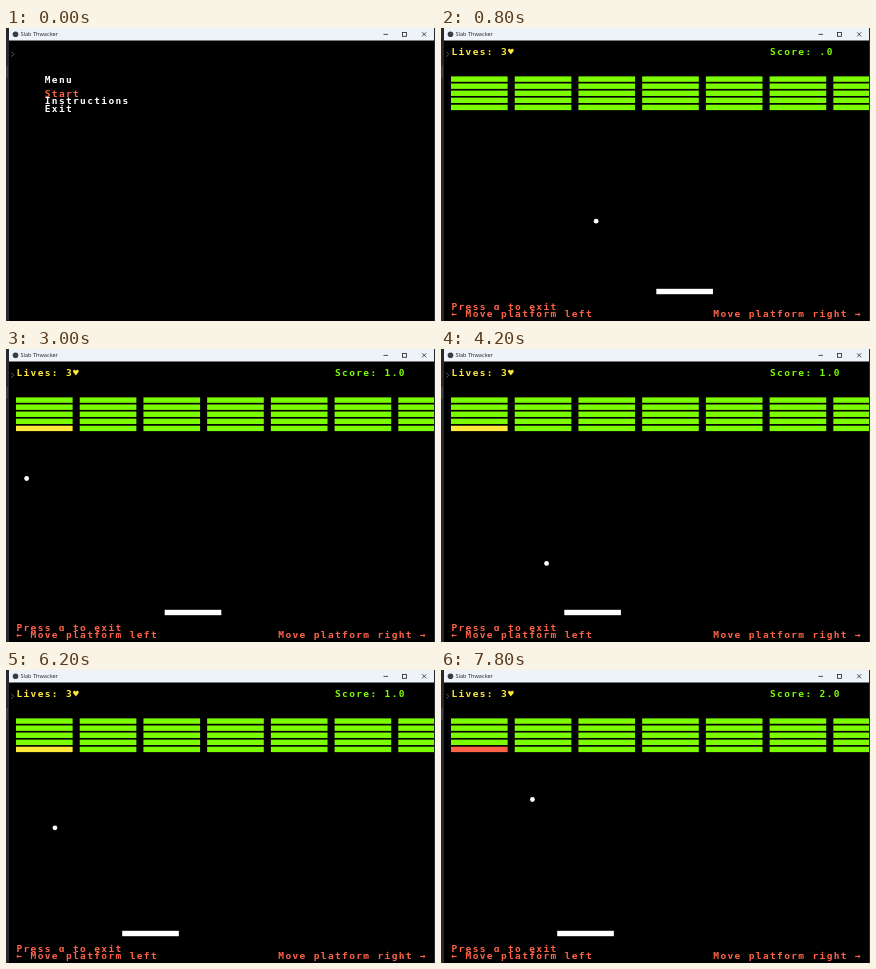
An HTML page that plays this animation: 429x293 px, repeating every 8000 ms.

```html
<!DOCTYPE html>
<html lang="en">
<head>
<meta charset="utf-8">
<title>Slab Thwacker</title>
<style>
  html, body { margin: 0; width: 100%; height: 100%; overflow: hidden; background: #000; }
  svg { display: block; width: 100vw; height: 100vh; }
  .cell { font: bold 9.5px "DejaVu Sans Mono", monospace; letter-spacing: 1.36px; white-space: pre; }
  .title { font: 5.6px "Open Sans", sans-serif; }
</style>
</head>
<body>
<svg id="stage" viewBox="0 0 429 293">
  <rect width="429" height="293" fill="#26282d"/>
  <rect y="38" width="2" height="12" fill="#3b3e47"/>
  <rect x="3" y="12" width="425" height="281"/>
  <rect x="3" width="425" height="12.5" fill="#eef2f9"/>
  <circle cx="9.5" cy="6.3" r="2.8" fill="#3a3d42"/>
  <text class="title" x="14.5" y="8.3" fill="#222">Slab Thwacker</text>
  <g fill="none" stroke="#222" stroke-width=".8">
    <path d="M377.5 6.4h4.5M416.2 4.3l4 4M420.2 4.3l-4 4"/>
    <rect x="396.5" y="4.4" width="3.9" height="3.9"/>
  </g>
  <path d="M5.3 23.8l2.5 2.5-2.5 2.5" fill="none" stroke="#55585e"/>
  <g id="menu"></g>
  <g id="game"></g>
</svg>
<script>
const NS = "http://www.w3.org/2000/svg";
const LOOP = 8000, TICK = 200, GAME_START = 200;
const CELL = 7.08, EDGE = 428;
const LIME = "#7cfc00", YELLOW = "#ffe93b", TOMATO = "#ff6347", WHITE = "#fff";
const HITS = [2600, 7400];

// [time, column, row]: straight runs between bounces
const BALL = [
  [200, 26, 31], [800, 20, 25], [2000, 9, 14], [2400, 5, 10], [2900, 0, 15],
  [4800, 19, 34], [6700, 0, 15], [7200, 5, 10], [7800, 11, 16]
];
// [time, column]
const PADDLE = [[800, 29], [2000, 26], [3000, 21], [4200, 16], [4800, 16], [5000, 15]];

const menu = document.getElementById("menu");
const game = document.getElementById("game");
const colX = c => 10 + c * CELL;
const rowY = r => 16.5 + r * CELL;

function add(parent, tag, attrs) {
  const el = document.createElementNS(NS, tag);
  for (const k in attrs) el.setAttribute(k, attrs[k]);
  return parent.appendChild(el);
}

// A terminal row: each line blanks its own cells before drawing
function write(parent, col, row, str, fill) {
  add(parent, "rect", {
    x: colX(col), y: rowY(row) - 3.5, width: Math.min(str.length * CELL, EDGE - colX(col)), height: CELL
  });
  const el = add(parent, "text", { class: "cell", x: colX(col) + 0.4, y: rowY(row) + 3.3, fill });
  el.textContent = str;
  return el;
}

function bar(col, row, fill) {
  const x = colX(col);
  return add(game, "rect", {
    x, y: rowY(row) - 3.5, width: Math.min(8 * CELL, EDGE - x), height: 5.4, fill
  });
}

write(menu, 4, 5, "Menu", WHITE);
write(menu, 4, 7, "Start", TOMATO);
write(menu, 4, 8, "Instructions", WHITE);
write(menu, 4, 9, "Exit", WHITE);

write(game, 0, 1, "Lives: 3♥", YELLOW);
const score = write(game, 45, 1, "Score: .0", LIME);
write(game, 0, 37, "Press q to exit", TOMATO);
write(game, 0, 38, "← Move platform left", TOMATO);
write(game, 37, 38, "Move platform right →", TOMATO);

let target;
for (let row = 5; row < 10; row++) {
  for (let i = 0; i < 7; i++) {
    const brick = bar(i * 9, row, LIME);
    if (row === 9 && i === 0) target = brick;
  }
}
const paddle = bar(0, 35, WHITE);
const ball = add(game, "circle", { r: 2.4, fill: WHITE });

function track(keys, t, field) {
  if (t <= keys[0][0]) return keys[0][field];
  for (let i = 1; i < keys.length; i++) {
    const a = keys[i - 1], b = keys[i];
    if (t <= b[0]) return Math.round(a[field] + (b[field] - a[field]) * (t - a[0]) / (b[0] - a[0]));
  }
  return keys[keys.length - 1][field];
}

function draw(ms) {
  const t = Math.floor((ms % LOOP) / TICK) * TICK;
  const playing = t >= GAME_START;
  menu.style.display = playing ? "none" : "";
  game.style.display = playing ? "" : "none";

  const hits = HITS.filter(h => t >= h).length;
  score.textContent = "Score: " + (hits || "") + ".0";
  target.setAttribute("fill", [LIME, YELLOW, TOMATO][hits]);
  paddle.setAttribute("x", colX(track(PADDLE, t, 1)));
  ball.setAttribute("cx", colX(track(BALL, t, 1) + 0.5));
  ball.setAttribute("cy", rowY(track(BALL, t, 2)) - 0.3);
}

const start = performance.now();
function frame() {
  draw(Math.max(0, performance.now() - start));
  requestAnimationFrame(frame);
}
frame();
</script>
</body>
</html>
```
